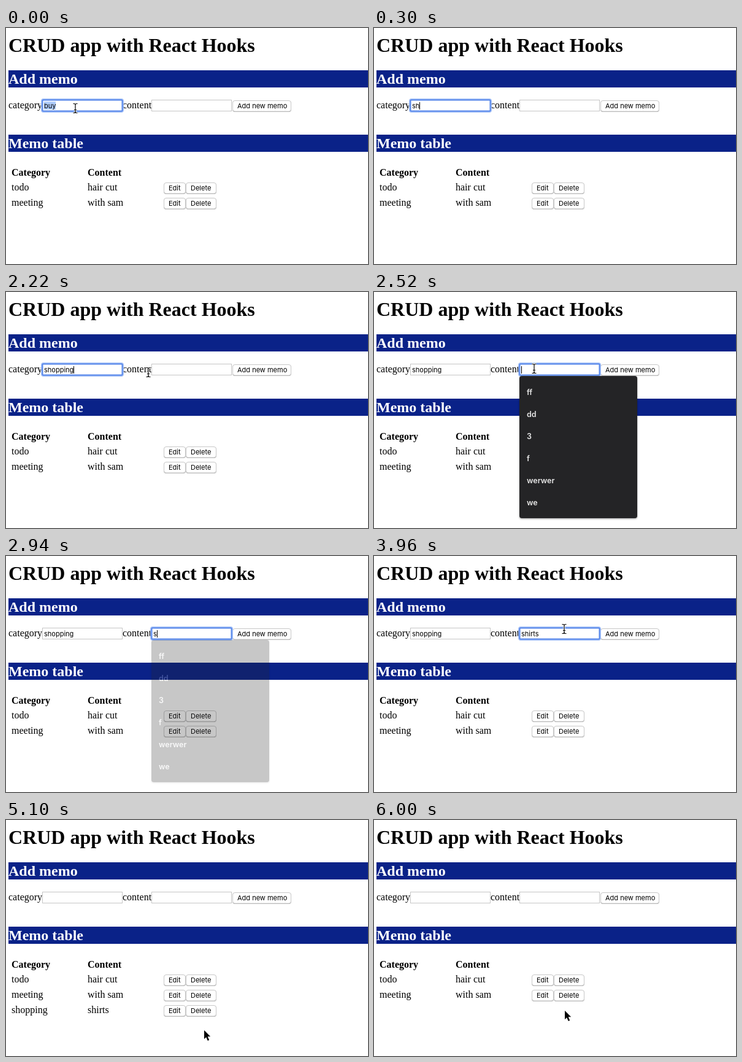
An HTML page that plays this animation: 590 px wide and 385 px high, repeating every 6720 ms.

```html
<!DOCTYPE html>
<html lang="en">
<head>
<meta charset="utf-8">
<title>CRUD app with React Hooks</title>
<style>
  html, body { margin: 0; width: 100%; height: 100%; overflow: hidden; background: #fff; }
  svg { display: block; }
  text { font: 16px "Liberation Serif", serif; white-space: pre; }
  .h1 { font-size: 32px; font-weight: bold; }
  .h2 { font-size: 24px; font-weight: bold; fill: #fff; }
  .th { font-weight: bold; }
  .ui { font: 11px Inter, sans-serif; }
  .item { font: 600 12.5px Inter, sans-serif; fill: #e6e6e6; }
  .box { fill: #fff; stroke: #c6c6c6; }
  .edge { fill: #b4b4b4; }
  .face { fill: #fff; stroke: #c8c8c8; }
  .pressed .face { fill: url(#blue); stroke: #2a72e0; }
  .pressed text { fill: #fff; }
  .menu { fill: #242426; filter: drop-shadow(0 1px 1.5px #0006); }
</style>
</head>
<body>
<svg id="stage" width="590" height="385" viewBox="0 0 590 385">
  <defs>
    <linearGradient id="blue" x2="0" y2="1">
      <stop stop-color="#6cb0fa"/><stop offset="1" stop-color="#1568f0"/>
    </linearGradient>
  </defs>
</svg>
<script>
const LOOP = 6720, TICK = 60;
const stage = document.getElementById("stage");

function add(tag, attrs, parent = stage, content = "") {
  const el = document.createElementNS("http://www.w3.org/2000/svg", tag);
  for (const k in attrs) el.setAttribute(k, attrs[k]);
  el.textContent = content;
  return parent.appendChild(el);
}
const group = () => add("g", {});
const label = (x, y, s, cls = "", parent = stage) => add("text", { x, y, class: cls }, parent, s);
const rect = (x, y, width, height, attrs, parent = stage) =>
  add("rect", { x, y, width, height, ...attrs }, parent);
const show = (el, on) => el.setAttribute("opacity", +on);

function heading(y, s) {
  rect(4, y, 586, 28, { fill: "#0a2288" });
  label(4, y + 22, s, "h2");
}

function button(x, y, w, s, parent = stage) {
  const g = add("g", {}, parent);
  rect(x, y + 1, w, 18, { rx: 4, class: "edge" }, g);
  rect(x + 0.5, y + 0.5, w - 1, 17.5, { rx: 3.5, class: "face" }, g);
  label(x + 8, y + 13, s, "ui", g);
  return g;
}

function row(y, category, content) {
  const g = group();
  label(9, y, category, "", g);
  label(133, y, content, "", g);
  button(257, y - 13, 36, "Edit", g);
  return { g, del: button(293, y - 13, 50, "Delete", g) };
}

function field(x) {
  rect(x + 0.5, 117.5, 130, 18, { class: "box" });
  const ring = group();
  rect(x - 0.5, 116.5, 132, 20, { rx: 2.5, fill: "none", stroke: "#a9c4f7", "stroke-width": 3 }, ring);
  rect(x + 0.5, 117.5, 130, 18, { rx: 1, fill: "#fff", stroke: "#5585ea", "stroke-width": 2 }, ring);
  const mark = rect(x + 3, 120, 19, 13, { fill: "#b0cdfb", opacity: 0 });
  const text = label(x + 3, 131, "", "ui");
  const caret = rect(0, 121, 1, 12, {});
  return {
    mark,
    set(s, focus, caretOn) {
      if (text.textContent !== s) text.textContent = s;
      show(ring, focus);
      show(caret, focus && caretOn);
      caret.setAttribute("x", Math.round(x + 3 + (s ? text.getComputedTextLength() : 0)));
    }
  };
}

function menu(x, items) {
  const g = group();
  rect(x, 137, 192, 16 + 36 * items.length, { rx: 4, class: "menu" }, g);
  items.forEach((s, i) => label(x + 12, 168 + 36 * i, s, "item", g));
  return g;
}

// Static page
label(4, 39, "CRUD app with React Hooks", "h1");
heading(69, "Add memo");
label(4, 131, "category");
label(190, 131, "content");
const addButton = button(369, 118, 96, "Add new memo");
heading(174, "Memo table");
label(9, 241, "Category", "th");
label(133, 241, "Content", "th");
row(265, "todo", "hair cut");
row(290, "meeting", "with sam");

// Moving parts
const newRow = row(315, "shopping", "shirts");
const category = field(59), content = field(237);
const menu1 = menu(59, ["s", "sd", "ss", "sdf", "sss"]);
const menu2 = menu(237, ["ff", "dd", "3", "f", "werwer", "we"]);
const arrow = add("path", {
  d: "M0 0V14.2L3.2 11.2 5.7 17 8.2 16 5.7 10.3H10.2Z",
  stroke: "#fff", "stroke-width": 1, "paint-order": "stroke"
});
const beam = group();
const beamPath = "M-3.5 -7.5H-2Q0 -7.5 0 -5.5Q0 -7.5 2 -7.5H3.5M0 -5.5V5.5M-3.5 7.5H-2Q0 7.5 0 5.5Q0 7.5 2 7.5H3.5M-2 2.5H2";
for (const [stroke, w] of [["#fff", 3], ["#000", 1.2]])
  add("path", { d: beamPath, fill: "none", stroke, "stroke-width": w }, beam);

// Timelines: [time, value]
const categoryText = [[0, "buy"], [60, "s"], [300, "sh"], [360, "sho"], [600, "shop"], [780, "shopp"],
  [960, "shoppp"], [1260, "shopp"], [1380, "shoppi"], [1620, "shoppin"], [1680, "shopping"], [4560, ""]];
const contentText = [[0, ""], [2820, "s"], [3000, "sh"], [3180, "shi"], [3360, "shir"],
  [3420, "shirt"], [3480, "shirts"], [4560, ""]];
const menu1Fade = [[0, 0], [60, 1], [180, 0.6], [240, 0.25], [300, 0]];
const menu2Fade = [[0, 0], [2400, 0.5], [2460, 1], [2880, 0.6], [2940, 0.25], [3000, 0]];
// [time, x, y, shape]
const pointer = [[0, 113, 131, beam], [60, 113, 131], [1800, 115, 163, arrow], [1920, 115, 163, arrow],
  [2160, 205, 146, arrow], [2220, 232, 131, beam], [2340, 261, 125, beam], [2820, 261, 125],
  [3960, 310, 119, beam], [4080, 350, 119, beam], [4140, 378, 121, arrow], [4320, 424, 125, arrow],
  [4680, 424, 125, arrow], [4920, 352, 335, arrow], [4980, 336, 359, arrow], [5100, 323, 343, arrow],
  [5400, 312, 317, arrow], [5580, 311, 311, arrow], [LOOP, 311, 311, arrow]];

const indexAt = (list, t) => list.findLastIndex(k => k[0] <= t);
const at = (list, t) => list[indexAt(list, t)][1];
const within = (t, a, b) => t >= a && t < b;

function placePointer(t) {
  const i = indexAt(pointer, t);
  const [t0, x0, y0, shape] = pointer[i], [t1, x1, y1] = pointer[i + 1];
  const p = (t - t0) / (t1 - t0);
  show(arrow, shape === arrow);
  show(beam, shape === beam);
  if (shape)
    shape.setAttribute("transform", `translate(${x0 + (x1 - x0) * p} ${y0 + (y1 - y0) * p})`);
}

function draw(t) {
  show(category.mark, t < 60);
  category.set(at(categoryText, t), t < 2340, t >= 60);
  content.set(at(contentText, t), within(t, 2340, 4380), t < 3960);
  show(menu1, at(menu1Fade, t));
  show(menu2, at(menu2Fade, t));
  show(newRow.g, within(t, 4560, 6000));
  addButton.classList.toggle("pressed", within(t, 4380, 4560));
  newRow.del.classList.toggle("pressed", within(t, 5880, 6000));
  placePointer(t);
}

const start = performance.now();
function frame() {
  const t = (performance.now() - start) % LOOP;
  draw(Math.floor(t / TICK) * TICK);
  requestAnimationFrame(frame);
}
frame();
</script>
</body>
</html>
```
